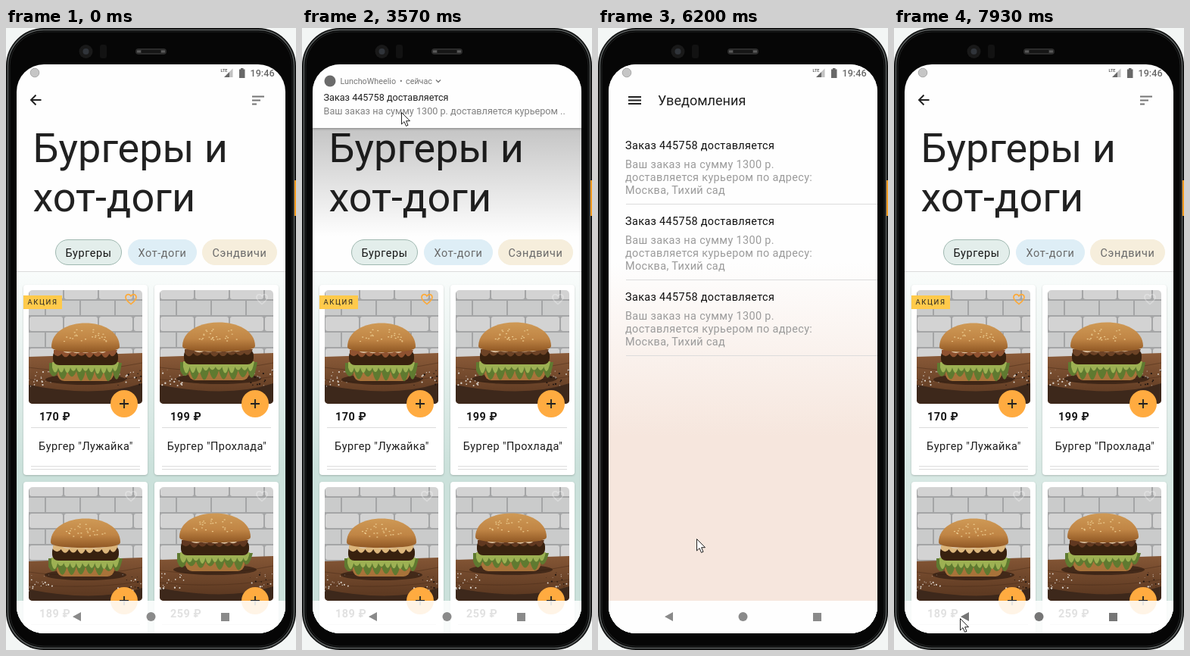
Write an HTML page that moves like this. It is 383x821 px and loops after 7990 ms.

```html
<!DOCTYPE html>
<html lang="ru">
<head>
<meta charset="utf-8">
<title>Доставка еды</title>
<style>
html, body { margin: 0; width: 100%; height: 100%; overflow: hidden; background: #f3f6f5; }
svg { display: block; width: 383px; height: 821px; font-family: Roboto, "Noto Sans", sans-serif; }
text { white-space: pre; }
.card { fill: #fff; filter: drop-shadow(0 1px 1px rgba(0,0,0,.2)); }
.rule { stroke: #dcdcdc; stroke-width: 1; }
.body { font-size: 14.45px; letter-spacing: .35px; }
.chip { font-size: 14.45px; letter-spacing: .6px; }
.name { font-size: 14.45px; letter-spacing: .42px; fill: #1c1c1c; text-anchor: middle; }
.price { font-size: 14.45px; letter-spacing: .5px; font-weight: 700; fill: #161616; }
.note { font-size: 12.65px; }
.head { font-size: 10.8px; fill: #757575; }
</style>
</head>
<body>
<svg id="stage" viewBox="0 0 383 821" xmlns="http://www.w3.org/2000/svg"></svg>
<script>
const LOOP = 7990;
const svg = document.getElementById('stage');

let seed = 7;
const rnd = () => (seed = (seed * 16807) % 2147483647) / 2147483647;
const repeat = (n, make) => Array.from({ length: n }, (_, i) => make(i)).join('');

const label = (x, y, text, cls, extra = '') => `<text x="${x}" y="${y}" class="${cls}" ${extra}>${text}</text>`;
const rule = (x1, x2, y) => `<path class="rule" d="M${x1} ${y}H${x2}"/>`;
const heart = (x, y, look) =>
  `<path transform="translate(${x} ${y})" fill="none" stroke-width="1.6" ${look}
    d="M0 6.5C-3 3.8 -7 1 -7 -2.6C-7 -6.8 -2 -7.6 0 -4.2C2 -7.6 7 -6.8 7 -2.6C7 1 3 3.8 0 6.5Z"/>`;

// Band with a flat top and a ruffled lower edge.
function ruffle(w, y, h, n, fill) {
  const step = 2 * w / n;
  let d = `M${-w} ${y}H${w}`;
  for (let i = 0; i < n; i++) {
    const x = w - i * step;
    const deep = h * (.75 + .5 * rnd());
    d += `Q${x - step / 2} ${y + deep * 1.5} ${x - step} ${y + h * .55}`;
  }
  return `<path d="${d}Z" fill="${fill}"/>`;
}

function burger(cx, top, w, sauce) {
  const seeds = repeat(26, () => {
    const a = rnd() * Math.PI, r = Math.sqrt(rnd()) * .75;
    return `<ellipse cx="${Math.cos(a) * r * w * .85}" cy="${25 - Math.sin(a) * r * 24}" rx="1.2" ry=".7" fill="#e9c78a"/>`;
  });
  return `<g transform="translate(${cx} ${top})">
    <ellipse cy="75" rx="${w + 8}" ry="7" fill="#24150c" opacity=".6"/>
    <rect x="${-w + 8}" y="58" width="${2 * w - 16}" height="19" rx="9" fill="#a8733a"/>
    ${ruffle(w + 3, 53, 20, 8, '#5f7a30')}
    ${ruffle(w - 1, 52, 13, 11, '#9db153')}
    <rect x="${-w + 2}" y="36" width="${2 * w - 4}" height="20" rx="8" fill="#38210f"/>
    ${ruffle(w - 3, 36, 9, 8, sauce)}
    ${ruffle(w - 16, 36, 4, 5, '#dcc4a4')}
    <path d="M${-w} 32C${-w} -10 ${w} -10 ${w} 32Q${w} 39 0 39Q${-w} 39 ${-w} 32Z" fill="url(#bun)"/>
    ${seeds}</g>`;
}

function photo(x, y, p) {
  const crumbs = repeat(38, i => {
    const cx = i % 2 ? rnd() * 32 : 118 + rnd() * 32;
    return `<circle cx="${cx}" cy="${p.board + 17 + rnd() * 22}" r="${.4 + rnd() * .8}" fill="${i % 4 ? '#d8d0c8' : '#1e1410'}"/>`;
  });
  return `<g transform="translate(${x} ${y})" clip-path="url(#photo)">
    <rect width="150" height="150" fill="url(#bricks)"/>
    <path d="M0 ${p.board}L150 ${p.board - 5}V150H0Z" fill="url(#wood)"/>
    <path d="M0 ${p.board + 14}Q70 ${p.board + 24} 150 ${p.board + 8}M0 ${p.board + 30}Q80 ${p.board + 38} 150 ${p.board + 26}"
      fill="none" stroke="#4a2d18" stroke-width="1.2" opacity=".5"/>
    <path d="M0 ${p.board + 37}Q90 ${p.board + 55} 150 ${p.board + 35}V150H0Z" fill="#3d281b"/>
    ${crumbs}${burger(p.cx, p.top, p.w, p.sauce)}</g>`;
}

function card(x, y, item) {
  const bx = x + 133, by = y + 157;
  return `<rect class="card" x="${x}" y="${y}" width="164" height="251" rx="4"/>
    ${photo(x + 7, y + 7, item)}
    ${heart(x + 142, y + 19, item.sale ? 'stroke="#ffa832"' : 'stroke="#fff" opacity=".3"')}
    ${rule(x + 10, x + 154, y + 188.5)}${rule(x + 10, x + 154, y + 239.5)}${rule(x + 10, x + 154, y + 243.5)}
    ${label(x + 21, y + 179, item.price + ' ₽', 'price')}
    ${label(x + 82.5, y + 218, item.name, 'name')}
    <circle cx="${bx}" cy="${by}" r="18" fill="#ffab40"/>
    <path d="M${bx - 6} ${by}h12m-6 -6v12" stroke="#212121" stroke-width="1.8"/>
    ${item.sale ? `<rect x="${x}" y="${y + 14}" width="51" height="18" fill="#ffca4b"/>
      ${label(x + 5.5, y + 26, 'АКЦИЯ', '', 'font-size="9.5" letter-spacing="1.6" fill="#222"')}` : ''}`;
}

const chip = (x, w, text, fill, ink, stroke) =>
  `<rect x="${x + .5}" y="279.5" width="${w - 1}" height="33" rx="16.5" fill="${fill}" stroke="${stroke || fill}"/>
   ${label(x + w / 2, 302, text, 'chip', `text-anchor="middle" fill="${ink}"`)}`;

const items = [
  { price: 170, name: 'Бургер "Лужайка"', sale: true, cx: 75, top: 43, w: 45, board: 88, sauce: '#8f5230' },
  { price: 199, name: 'Бургер "Прохлада"', cx: 78, top: 42, w: 48, board: 88, sauce: '#6d4326' },
  { price: 189, name: '', cx: 75, top: 41, w: 46, board: 98, sauce: '#dcb67c' },
  { price: 259, name: '', cx: 73, top: 34, w: 47, board: 96, sauce: '#613820' }
];

const menuPage = `
  <rect x="14" y="48" width="355" height="751" fill="#fefefe"/>
  <rect x="14" y="322" width="355" height="477" fill="#f9fcfb"/>
  <rect id="mint" x="14" y="322" width="355" height="477" fill="url(#mintFade)"/>
  ${rule(14, 369, 321.5)}
  <path d="M46.5 95H33.5M39.5 88.5L33 95L39.5 101.5" fill="none" stroke="#212121" stroke-width="1.9"/>
  <path d="M325 90.5h16m-16 5h11m-11 5h6" stroke="#757575" stroke-width="1.8"/>
  <g font-size="54" fill="#212121"><text x="35.5" y="177">Бургеры и</text><text x="35.5" y="242">хот-доги</text></g>
  ${chip(65, 88, 'Бургеры', '#e3eeeb', '#141414', '#9fb8b0')}
  ${chip(161, 91, 'Хот-доги', '#deeef6', '#6a6a6a')}
  ${chip(259, 99, 'Сэндвичи', '#f6eedc', '#6a6a6a')}
  ${items.map((item, i) => card(i % 2 ? 196 : 23, i < 2 ? 339 : 599, item)).join('')}
  <rect x="14" y="756" width="355" height="43" fill="#fff" opacity=".87"/>`;

const ORDER = 'Заказ 445758 доставляется';
const listItem = i => {
  const y = 100 * i;
  const lines = ['Ваш заказ на сумму 1300 р.', 'доставляется курьером по адресу:', 'Москва, Тихий сад'];
  return label(36, 160 + y, ORDER, 'body', i === 2 ? 'id="fresh"' : 'fill="#111"')
    + lines.map((s, k) => label(36, 185 + y + 17 * k, s, 'body', 'fill="#9b9b9b"')).join('')
    + rule(37, 369, 232.5 + y);
};

const listPage = `
  <rect x="14" y="48" width="355" height="751" fill="#fefefe"/>
  <rect x="14" y="48" width="355" height="708" fill="url(#peach)"/>
  <path d="M40 91h17m-17 4.5h17m-17 4.5h17" stroke="#212121" stroke-width="1.8"/>
  ${label(79, 102, 'Уведомления', '', 'font-size="18.07" fill="#212121"')}
  ${repeat(3, listItem)}
  <circle id="dot" cx="349" cy="355.5" r="5" fill="#ffab40"/>`;

const statusBar = `
  <circle cx="38" cy="59" r="5.8" fill="#c6c6c6" stroke="#a9a9a9"/>
  <g fill="#686868">
    <text x="283.5" y="57.5" font-size="5.5" font-weight="700">LTE</text>
    <path d="M288 65L295 58V65Z"/><path d="M295 65V58L299.5 53.5V65Z" opacity=".4"/>
    <path d="M308 54.5h2v-1.5h3.5v1.5h2V66H308Z"/>
    <text x="322.5" y="64" font-size="12.65" font-weight="500">19:46</text>
  </g>`;

const banner = `
  <rect x="14" y="-60" width="355" height="192" fill="#fefefe" style="filter:drop-shadow(0 1px 1.5px rgba(0,0,0,.35))"/>
  <circle cx="37" cy="70" r="7.5" fill="#6b6b6b"/>
  ${label(50.5, 74, 'LunchoWheelio', 'head')}
  ${label(129, 74, '•', 'head')}${label(137, 74, 'сейчас', 'head')}
  <path d="M177 68.5l3 3l3 -3" fill="none" stroke="#757575" stroke-width="1.3"/>
  ${label(28.5, 96, ORDER, 'note', 'fill="#212121"')}
  ${label(28.5, 113.5, 'Ваш заказ на сумму 1300 р. доставляется курьером ..', 'note', 'fill="#808080"')}`;

const phone = `
  <rect width="383" height="821" rx="50" fill="#0d0e0e"/>
  <rect x="2.5" y="2.5" width="378" height="816" rx="47.5" fill="#060606" stroke="#5a5e5e" stroke-width="1.6"/>
  <rect x="5" y="5" width="373" height="811" rx="45" fill="none" stroke="#222424"/>
  <rect x="381" y="201" width="2" height="47" fill="#f29a1f"/>
  <circle cx="105.5" cy="31" r="9" fill="#191919"/><circle cx="105.5" cy="31" r="4" fill="#30343a"/>
  <rect x="124" y="22" width="9" height="18" rx="3" fill="#121212"/>
  <rect x="171" y="27" width="41" height="8" rx="4" fill="#2b2b2b"/>
  <path d="M179 31H204" stroke="#161616" stroke-width="4"/>
  <path d="M173 31h5m27 0h5" stroke="#5a5a5a" stroke-width="3"/>`;

const stop = (at, color, alpha = 1) => `<stop offset="${at}" stop-color="${color}" stop-opacity="${alpha}"/>`;
const fade = (id, y1, y2, stops) =>
  `<linearGradient id="${id}" gradientUnits="userSpaceOnUse" x1="0" x2="0" y1="${y1}" y2="${y2}">${stops}</linearGradient>`;

svg.innerHTML = `
  <defs>
    ${fade('mintFade', 322, 580, stop(0, '#cbe1db', 0) + stop(.35, '#cbe1db', .3) + stop(1, '#cbe1db'))}
    ${fade('peach', 310, 540, stop(0, '#f6e6dd', 0) + stop(1, '#f6e6dd'))}
    ${fade('shade', 48, 275, stop(0, '#000', .36) + stop(1, '#000', 0))}
    ${fade('bun', 0, 40, stop(0, '#cf9a56') + stop(.55, '#c08545') + stop(1, '#8d5522'))}
    ${fade('wood', 85, 140, stop(0, '#8a5a38') + stop(1, '#5e3a22'))}
    <pattern id="bricks" width="46" height="42" patternUnits="userSpaceOnUse" y="-8">
      <rect width="46" height="42" fill="#a4a5a6"/>
      <rect x="1" y="1" width="44" height="19" rx="3" fill="#d3d3d3"/>
      <path d="M0 22H21V41H0ZM23 22H46V41H23Z" fill="#cacbcb"/>
    </pattern>
    <clipPath id="photo"><rect width="150" height="150" rx="5"/></clipPath>
    <clipPath id="screen"><rect x="14" y="48" width="355" height="751" rx="36"/></clipPath>
  </defs>
  <rect width="383" height="821" fill="#f3f6f5"/>
  ${phone}
  <g clip-path="url(#screen)">
    <g>${menuPage}</g>
    <g id="list">${listPage}</g>
    ${statusBar}
    <rect id="ripple" fill="#000"/>
    <g id="nav"><path d="M88 777L99 771V783Z"/><circle cx="191.5" cy="777" r="6"/><rect x="284" y="772" width="11" height="11"/></g>
    <rect id="scrim" x="14" y="48" width="355" height="227" fill="url(#shade)"/>
    <g id="banner">${banner}</g>
  </g>
  <path id="cursor" d="M.5 .5V16L4 12.6L6.5 18.4L9 17.3L6.6 11.7H11.5Z" fill="#fff" stroke="#222" stroke-width="1"/>`;

const part = {};
for (const id of ['list', 'mint', 'fresh', 'dot', 'ripple', 'nav', 'scrim', 'banner', 'cursor'])
  part[id] = document.getElementById(id);
const set = (id, attrs) => { for (const k in attrs) part[id].setAttribute(k, attrs[k]); };

const clamp = v => Math.max(0, Math.min(1, v));
const smooth = p => p * p * (3 - 2 * p);
const mix = (a, b, p) => a + (b - a) * p;

// Progress in n visible steps, the first shown at t0 and the last at t1.
function steps(t, t0, t1, n) {
  if (t < t0) return 0;
  return Math.min(1, (Math.floor((t - t0) / (t1 - t0) * (n - 1) + .001) + 1) / n);
}

function cursorAt(t) {
  if (t >= 660 && t < 730) return [89, 798];
  if (t < 3020) return null;
  if (t < 5640) {
    const p = (steps(t, 3020, 3570, 9) * 9 - 1) / 8;
    const e = smooth(p);
    return [mix(19, 131, e), mix(134, 111, e)];
  }
  if (t < 6480) {
    const s = smooth(steps(t, 5640, 6410, 12));
    return [131 - 43 * s + 285 * s ** 1.35 * (1 - s), mix(111, 778, s)];
  }
  return [87, 779];
}

function draw(t) {
  const drop = steps(t, 2110, 2820, 11);
  const open = steps(t, 3770, 4390, 9);
  const back = steps(t, 7090, 7790, 11);

  const lift = smooth(clamp(open / .55));
  const hidden = Math.max((1 - drop) ** 4, lift);
  set('banner', { transform: `translate(0 ${-84 * hidden})`, visibility: hidden < 1 ? 'visible' : 'hidden' });
  set('scrim', { opacity: 1 - hidden });

  const shown = clamp((open - .35) / .65) * (1 - clamp((back - .5) / .5));
  set('list', { opacity: shown, visibility: shown > 0 ? 'visible' : 'hidden' });
  set('mint', { opacity: back > 0 ? .72 : 1 });

  const read = t >= 5180;
  set('fresh', { fill: read ? '#111' : '#ffab40' });
  set('dot', { opacity: read ? 0 : 1 });

  const grow = smooth(clamp(back / .5));
  const w = 96 * grow, h = 42 * Math.sqrt(grow);
  set('ripple', {
    x: 94 - w / 2, y: 777 - h / 2, width: w, height: h, rx: h / 2,
    opacity: .055 * (1 - clamp((back - .65) / .35))
  });
  const dark = clamp(back / .4) * (1 - .5 * clamp((back - .65) / .35));
  const grey = Math.round(mix(138, 88, t >= 7930 ? .4 : dark));
  set('nav', { fill: `rgb(${grey},${grey},${grey})` });

  const at = cursorAt(t);
  set('cursor', { visibility: at ? 'visible' : 'hidden' });
  if (at) set('cursor', { transform: `translate(${Math.round(at[0])} ${Math.round(at[1])})` });
}

const start = performance.now();
function tick() {
  draw((performance.now() - start) % LOOP);
  requestAnimationFrame(tick);
}
tick();
</script>
</body>
</html>
```
